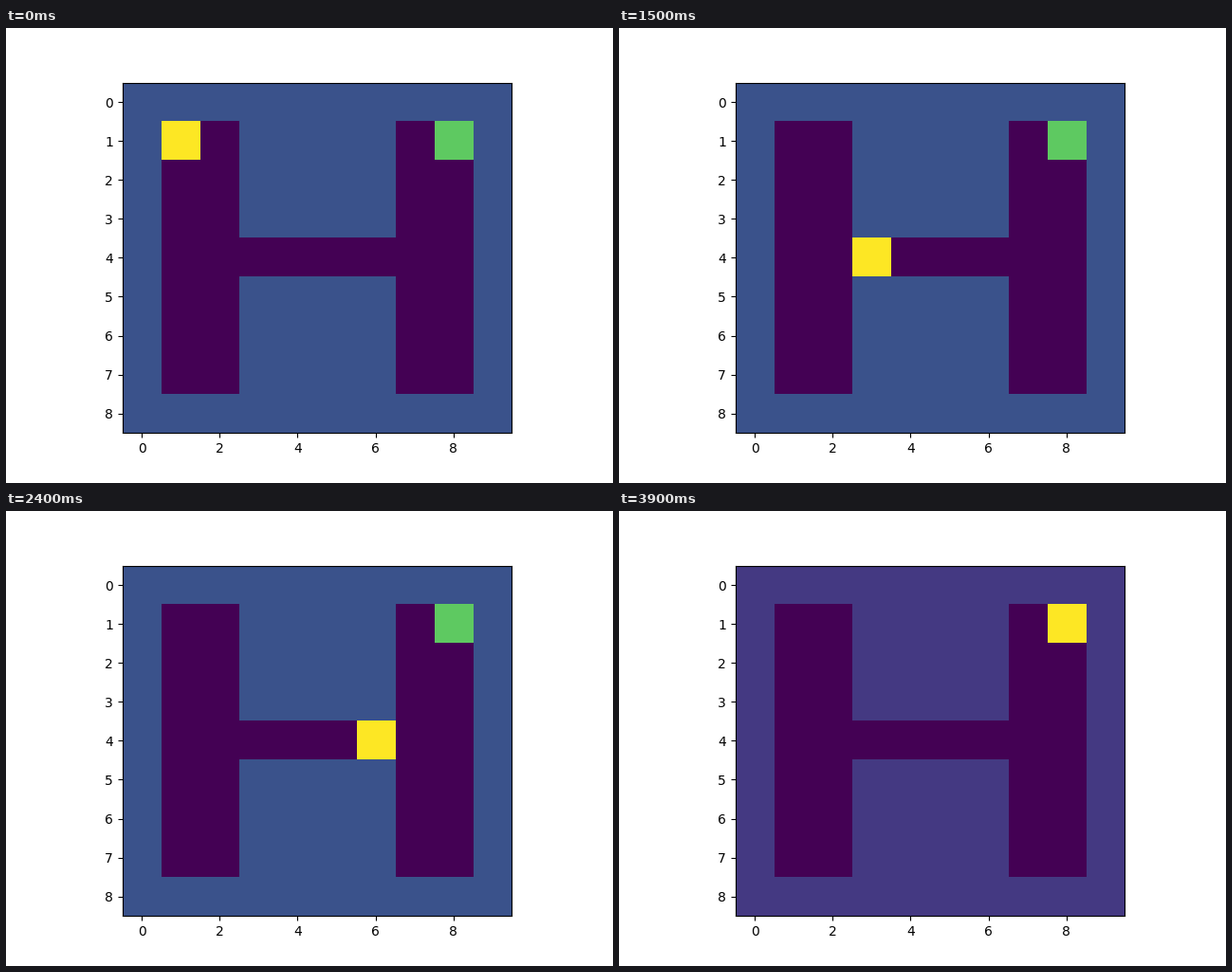
A matplotlib script for the animation above (4.2 s loop, 640 px wide and 480 px high).

```python
import numpy as np
import matplotlib.pyplot as plt
from matplotlib.animation import FuncAnimation

FREE, WALL, GOAL, AGENT, SOLVED = 0, 1, 3, 4, 6
STEP_MS = 300

# The maze is an H-shaped corridor.
maze = np.full((9, 10), WALL)
maze[1:8, 1:3] = FREE
maze[1:8, 7:9] = FREE
maze[4, 3:7] = FREE
goal = (1, 8)
maze[goal] = GOAL


def walk(start, moves):
    """Return every (row, column) cell visited from start."""
    steps = {"R": (0, 1), "D": (1, 0), "U": (-1, 0)}
    path = [start]
    for move in moves:
        dr, dc = steps[move]
        row, col = path[-1]
        path.append((row + dr, col + dc))
    return path


path = walk((1, 1), "RDDD" + "RRRRR" + "URUU")


def grid_at(step):
    grid = maze.copy()
    cell = path[step]
    grid[cell] = SOLVED if cell == goal else AGENT
    return grid


fig, ax = plt.subplots(figsize=(6.4, 4.8), dpi=100)
image = ax.imshow(grid_at(0), cmap="viridis")


def update(step):
    grid = grid_at(step)
    image.set_data(grid)
    # The colour scale follows the largest value, so walls darken at the goal.
    image.set_clim(grid.min(), grid.max())
    return [image]


anim = FuncAnimation(fig, update, frames=len(path), interval=STEP_MS,
                     repeat=True, repeat_delay=0)
plt.show()
```
